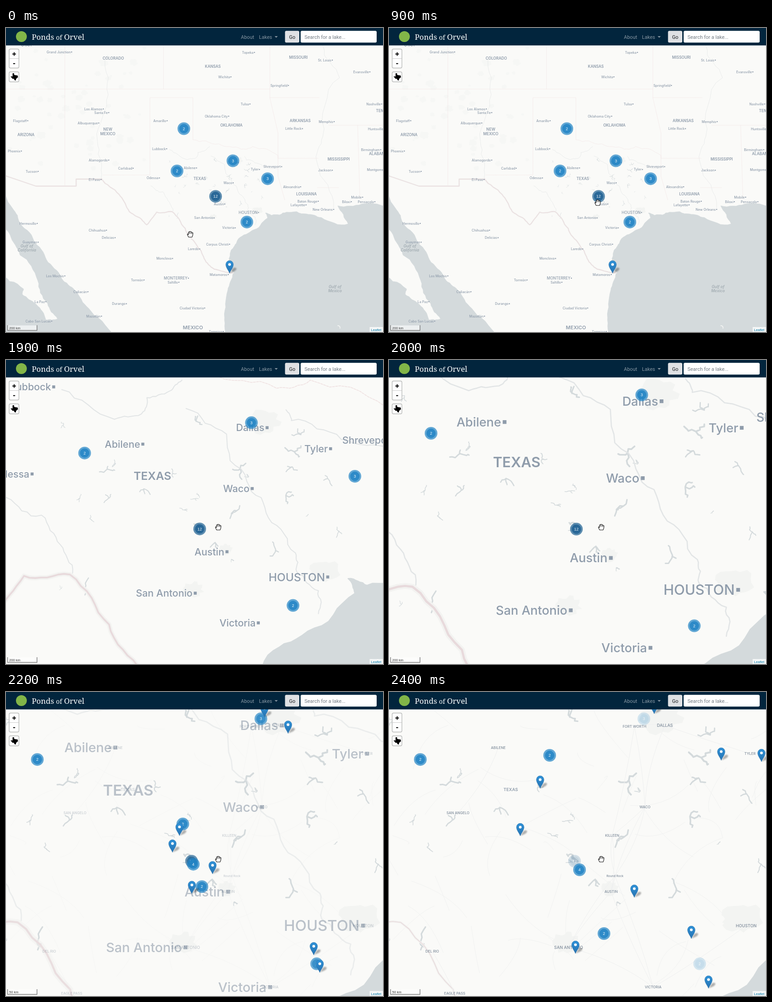
An HTML page that plays this animation: 833 by 672 pixels, repeating every 2500 ms.

```html
<!DOCTYPE html>
<html lang="en">
<head>
<meta charset="utf-8">
<title>Lake map</title>
<style>
  html, body { margin: 0; width: 100%; height: 100%; overflow: hidden; background: #fafaf8; }
  svg { display: block; width: 833px; height: 672px; }
  .map text { font-family: Inter, "Open Sans", sans-serif; font-weight: 600; fill: #8f9cab; text-anchor: middle; }
  .map .city { font-weight: 550; text-anchor: end; }
  .map .town { font-weight: 500; fill: #7f8c9b; }
  .map .water { font-style: italic; fill: #a3adb3; }
  .line { fill: none; stroke-linejoin: round; stroke-linecap: round; }
  .ui { font-family: Roboto, "Open Sans", sans-serif; font-size: 11px; }
  .small { font-family: "Liberation Sans", Arial, sans-serif; font-size: 7.6px; }
  .count { font-family: "Liberation Sans", Arial, sans-serif; font-size: 9px; fill: #fff; fill-opacity: .9; text-anchor: middle; }
</style>
</head>
<body>
<svg id="stage" viewBox="0 0 833 672"></svg>
<script>
const LOOP = 2500, STEP = 100, CENTER = [480.8, 371.6], ZOOM = 4;
const WATER = "#d4dadc", LAND = "#fafaf8";

function seeded(seed) {
  return () => {
    seed = (seed * 1664525 + 1013904223) >>> 0;
    return seed / 4294967296;
  };
}
const rnd = seeded(11);
const around = size => (rnd() - .5) * size;
const clamp = v => Math.max(0, Math.min(1, v));
const mix = (a, b, k) => a + (b - a) * k;
const zoomed = (x, y, s) => [mix(CENTER[0], x, s), mix(CENTER[1], y, s)];
const zoomTransform = s => `translate(${CENTER[0] * (1 - s)} ${CENTER[1] * (1 - s)}) scale(${s})`;
const line = (d, color, width, extra = "") =>
  `<path class="line" d="${d}" stroke="${color}" stroke-width="${width}" ${extra}/>`;
const text = (label, x, y, size, cls = "") =>
  `<text x="${x}" y="${y + size * .36}" font-size="${size}" class="${cls}">${label}</text>`;

// Natural line through a few points: every segment is split three times and bent at random
function rough(points, amount) {
  let list = points.split(" ").map(p => p.split(",").map(Number));
  for (let level = 0; level < 3; level++) {
    list = list.flatMap((p, i) => {
      const q = list[i + 1];
      if (!q) return [p];
      const bend = around(amount), dx = q[0] - p[0], dy = q[1] - p[1];
      return [p, [(p[0] + q[0]) / 2 - dy * bend, (p[1] + q[1]) / 2 + dx * bend]];
    });
  }
  return "M" + list.map(p => p.map(v => v.toFixed(1))).join("L");
}

function patch(x, y, size) {
  const d = [];
  for (let a = 0; a < 2 * Math.PI; a += .3) {
    const r = size * (.6 + .4 * rnd());
    d.push((x + Math.cos(a) * r).toFixed(1) + " " + (y + Math.sin(a) * r * .8).toFixed(1));
  }
  return "M" + d.join("L") + "Z";
}

// Reservoir: a few crooked arms leaving one centre
function reservoir(x, y, size) {
  let d = "";
  for (let arm = 0; arm < 3; arm++) {
    const a = rnd() * 2 * Math.PI;
    d += `M${x} ${y}`;
    for (let i = 0; i < 4; i++) d += `l${(Math.cos(a) * size / 4 + around(size / 2)).toFixed(1)} ${(Math.sin(a) * size / 4 + around(size / 2)).toFixed(1)}`;
  }
  return line(d, WATER, (size * .17).toFixed(1));
}

const gulf = rough("920,384 786,389 733,393 756,433 697,419 664,411 620,407 587,414 573,409 578,420 543,448 511,470 497,492 492,515 502,541 490,580 483,640 482,690", .2) + "V760H920Z";
const pacific = rough("-20,340 14,398 32,433 65,476 93,518 126,558 157,583 187,625 250,690", .16) + "H-20" +
  rough("-20,540 39,577 36,589 67,611 88,645 114,643 92,609 70,558 31,502 9,457 -20,410", .2).replace("M", "L") + "Z";
const border = "M0 327L66 349.5H155V334H211" +
  rough("211,333 250,368 269,400 284,414 311,435 333,407 367,406 396,443 420,478 438,510 460,533 502,541", .16).replace("M", "L");
const rivers = [
  "453,283 483,302 498,337 514,364 534,390 535,404 551,418 551,435",
  "361,269 400,291 420,287 424,275 441,270 450,262",
  "320,349 346,362 360,384 369,405",
  "527,284 531,292 568,306 599,311",
  "700,39 737,110 700,240 688,300 724,398",
  "225,60 222,160 203,260 210,333"
].map(r => rough(r, .3)).join("");
const stateLines = "M0 135H583V39M348 39V135M130 39V350M214 325H318V154H413V247" +
  rough("413,247 470,256 520,268 545,262 601,282", .2).replace("M", "L") +
  "V328L616 380M583 135V154H692M583 154L601 232V288H690M713 215H833M777 215L782 378M688 353H735";

const cities = [
  ["Grand Junction", 145, 53], ["Topeka", 549, 54], ["St. Louis", 721, 71], ["Wichita", 497, 108],
  ["Evansville", 804, 97], ["Springfield", 624, 127], ["Nashville", 830, 168], ["Tulsa", 539, 168],
  ["Oklahoma City", 492, 195], ["Memphis", 725, 207], ["Los Alamos", 215, 179], ["Santa Fe", 227, 187],
  ["Albuquerque", 205, 210], ["Amarillo", 356, 205], ["Flagstaff", 48, 205], ["Phoenix", 34, 272],
  ["Tucson", 71, 317], ["Alamogordo", 227, 292], ["Carlsbad", 281, 310], ["El Paso", 210, 335],
  ["Lubbock", 355, 267], ["Abilene", 421, 309.4], ["Odessa", 339, 331.5], ["Tyler", 560, 312.8],
  ["Waco", 502, 342.3], ["Dallas", 513, 297.2], ["Shreveport", 609, 306.5], ["Alexandria", 651, 351],
  ["Jackson", 721, 314.5], ["Little Rock", 655, 222.5], ["Birmingham", 828, 269], ["Huntsville", 836, 223],
  ["Montgomery", 844, 313], ["Baton Rouge", 690, 383], ["Lafayette", 663, 391], ["New Orleans", 724, 401],
  ["Mobile", 788, 374], ["Biloxi", 763, 384], ["Pensacola", 815, 384], ["Austin", 483.3, 389.1],
  ["San Antonio", 459.8, 419.8], ["Victoria", 506.5, 441.8], ["HOUSTON", 557.9, 407.8], ["MONTERREY", 403, 553],
  ["Corpus Christi", 494, 478], ["Laredo", 428, 488.5], ["Matamoros", 491, 545], ["Saltillo", 382, 562],
  ["Monclova", 368, 509.5], ["Torreón", 305, 557], ["Chihuahua", 222, 447], ["Delicias", 241, 463.5],
  ["Hermosillo", 69, 432], ["Guaymas", 71, 473.5], ["Los Mochis", 130, 548], ["Culiacán", 181, 583],
  ["La Paz", 88, 605], ["Cabo San Lucas", 101, 648], ["Durango", 266, 609.5], ["Mazatlán", 211, 637],
  ["Ciudad Victoria", 439, 619], ["Tampico", 480, 671]
];
const states = [
  ["UTAH", 45, 38], ["COLORADO", 237, 67], ["KANSAS", 457, 85], ["MISSOURI", 646, 65], ["NEW", 225, 224],
  ["MEXICO", 225, 234], ["ARIZONA", 44, 236], ["OKLAHOMA", 498, 215], ["ARKANSAS", 650, 205],
  ["MISSISSIPPI", 735, 290], ["ALABAMA", 823, 278], ["TENNESSEE", 842, 183], ["TEXAS", 428.1, 332.9],
  ["LOUISIANA", 664, 367]
];
// Places that only the closer map names
const smallTowns = [
  ["FORT WORTH", 496.2, 297.7], ["SAN ANGELO", 398.7, 345.5], ["KILLEEN", 483.9, 358],
  ["Round Rock", 485.4, 380.4], ["DEL RIO", 384.5, 422], ["EAGLE PASS", 396.9, 445.2]
];
const bigTowns = /DALLAS|HOUSTON|SAN ANTONIO/;
const towns = cities.filter(([n]) => /Abilene|Tyler|Waco|Dallas|Austin|San Antonio|Victoria$|HOUSTON/.test(n) && n !== "Ciudad Victoria")
  .concat(smallTowns).map(([n, x, y]) => [n === "Round Rock" ? n : n.toUpperCase(), ...zoomed(x, y, ZOOM)]);

const lakes = "400,55 245,255 140,283 137,197 330,210 406,360 455,415 520,320 530,195 690,145 684,190 710,95 665,275 635,435 70,551 790,225 822,380";

function ground() {
  const built = towns.filter(([n]) => bigTowns.test(n) || n === "AUSTIN").map(([n, x, y]) => {
    const size = n === "AUSTIN" ? 22 : n === "SAN ANTONIO" ? 34 : 52;
    return patch(x - size / 6, y - size / 3, size) + patch(x - size / 2, y - size / 3, size * .6);
  }).join("");
  const ponds = lakes.split(" ").map(p => reservoir(...p.split(",").map(Number), 12 + rnd() * 12)).join("");
  let specks = "";
  for (let i = 0; i < 12; i++) specks += reservoir(rnd() * 833, 45 + rnd() * 560, 6 + rnd() * 5);
  return `<g id="ground"><g transform="${zoomTransform(1 / ZOOM)}"><path d="${built}" fill="#f3f4f2"/>${ponds}${specks}</g>
    <path d="${gulf}${pacific}" fill="${WATER}" stroke="${WATER}" stroke-width=".8" stroke-linejoin="round"/></g>`;
}

function cityLabel([name, x, y]) {
  const size = name === name.toUpperCase() ? 8.3 : 7.25;
  return text(name, x - 2, y, size, "city") + `<rect x="${x - 1.1}" y="${y - 1.1}" width="2.2" height="2.2" fill="#8f9cab"/>`;
}
const waterLabel = (name, x, y) => text("Gulf of", x, y, 8.6, "water") + text(name, x, y + 8.5, 8.6, "water");

function wideMap() {
  let hills = "";
  for (let i = 0; i < 60; i++) hills += patch(rnd() * 310, 40 + rnd() * 270, 3 + rnd() * 9);
  return `<path d="${hills}" fill="#f6f7f5"/><use href="#ground"/>` +
    line(rivers, "#e2e5e6", .7) + line(stateLines, "#f0e3e3", .6, 'stroke-dasharray="1.5 .8"') +
    line(border, "#f3f3f1", 3.4) + line(border, "#e8dadc", 1.3) +
    states.map(([n, x, y]) => text(n, x, y, 8.3)).join("") + cities.map(cityLabel).join("") +
    text("MEXICO", 413, 662, 11) + waterLabel("California", 46, 482) + waterLabel("Mexico", 727, 572) +
    line("M733 658Q739 658 738 664", LAND, 1.4);
}

function closeMap() {
  let main = "", minor = "";
  const road = (a, b, bend) => `M${a}Q${(a[0] + b[0]) / 2 + around(bend)} ${(a[1] + b[1]) / 2 + around(bend)} ${b}`;
  towns.forEach(([, ...a], i) => towns.slice(i + 1).forEach(([, ...b]) => {
    if (Math.hypot(a[0] - b[0], a[1] - b[1]) < 260) main += road(a, b, 40);
  }));
  for (let i = 0; i < 60; i++) {
    const a = [rnd() * 833, 39 + rnd() * 633];
    minor += road(a, [a[0] + around(260), a[1] + around(220)], 60);
  }
  return `<rect width="833" height="672" fill="${LAND}"/>` + line(minor, "#f1f2f1", 1) +
    `<g transform="${zoomTransform(ZOOM)}"><use href="#ground"/>${line(border, "#f3f3f1", 1.2)}${line(border, "#e8dadc", .4)}</g>` +
    line(main, "#eff0f0", 1) + text("TEXAS", 269, 215.5, 9.5) +
    towns.map(([n, x, y]) => text(n, x, y, bigTowns.test(n) ? 9.1 : n === "Round Rock" ? 6.6 : 7.8, "town")).join("");
}

function cluster(x, y, count, opacity = 1) {
  const color = count > 9 ? "#1c5f92" : "#2183c4";
  return `<g transform="translate(${x} ${y})" opacity="${opacity}"><circle r="14" fill="${color}" fill-opacity=".7"/>
    <circle r="10.4" fill="${color}" fill-opacity=".8"/><text class="count" y="3.2">${count}</text></g>`;
}
const pin = (x, y) => `<g transform="translate(${x} ${y})">
  <path d="M0 0L7-10Q11-14 15-11 16-7 10-4Z" fill="#000" opacity=".3" filter="url(#soft)"/>
  <path d="M0 0C-2-6-8.3-12-8.3-19.4A8.3 8.3 0 0 1 8.3-19.4C8.3-12 2-6 0 0Z" fill="url(#pinFill)" stroke="#2a72ac" stroke-width=".7"/>
  <circle cy="-19.2" r="3" fill="#fff"/></g>`;

// Clusters on the wide map; kids are [x, y, count] on the closer one, without a count a single pin
const clusters = [
  { at: [393, 222.5], count: 2 },
  { at: [377.9, 316], count: 2 },
  { at: [501.4, 293.5], count: 3, kids: [[586, 48], [734, 151]] },
  { at: [578, 333.2], count: 3, kids: [[823, 154]] },
  { at: [463.1, 372.2], count: 12, kids: [[355, 140, 2], [334, 213], [290, 318], [421, 393, 4], [542, 454], [475, 534, 2], [412, 578]] },
  { at: [532.2, 428.9], count: 2, kids: [[668, 545], [706, 655]] }
];

function markers(t, scale) {
  const q = clamp((t - 2140) / 260), spread = 1 - (1 - q) ** 1.65, faded = 1 - .75 * q ** 1.6;
  const parents = clusters.map(c => cluster(...zoomed(...c.at, scale), c.count, c.kids ? faded : 1));
  const children = q === 0 ? [] : clusters.flatMap(({ at, kids = [] }) => kids.map(([x, y, count]) => {
    const from = zoomed(...at, scale), place = [mix(from[0], x, spread), mix(from[1], y, spread)];
    return count ? cluster(...place, count) : pin(...place);
  }));
  return parents.concat(pin(...zoomed(494, 542, scale)), children).join("");
}

const hull = '<path d="M444 309L455 313 498 394 487 416 464 426 432 357Z" fill="#ff8a1c" fill-opacity=".18" stroke="#ff9d42" stroke-width="1.9" stroke-linejoin="round"/>';
const openHand = `<path d="M-3.6 6.2L-6 1.6Q-6.8-.6-5.3-.8L-3.9 1V-3.9Q-3.6-5.6-1.9-5Q-1.5-6.6.2-6.3Q1.3-6.2 1.5-5Q3.5-5.6 3.9-3.8Q6.1-4 6.1-2L5.5 2.6 4 6.2Z" fill="#fff" stroke="#111" stroke-width="1.1" stroke-linejoin="round"/>
  <path d="M-1.6-4.6V-1M1.3-4.6V-1M3.8-3.5V-.7" stroke="#111"/>`;
const pointHand = `<path d="M-3 6.5L-6.4 1.2Q-6.8-.6-5-.2L-3.2 1.2V-5.2Q-3-6.8-1.8-6.6T-.7-5.2V-2Q1-2.8 1.6-1.5Q3.2-2 3.8-.7Q5.9-.9 6 1L5.2 4.4 4.2 6.5Z" fill="#111" stroke="#566" stroke-width=".7"/>
  <path d="M-.4 2.4V4.6M1.6 2.4V4.6M3.4 2.4V4.6" stroke="#9ab" stroke-width=".6"/>`;

function cursorAt(t) {
  if (t < 500) return [407, 456];
  if (t >= 1900) return [469, 369.5];
  if (t > 1000) return [467, t < 1200 ? 373 : 370];
  const k = (t - 500) / 500, e = k * k * (3 - 2 * k);
  return [mix(411, 467, e), mix(455, 378, e)];
}

const box = (x, y, w, h, fill, extra = "") => `<rect x="${x}" y="${y}" width="${w}" height="${h}" rx="3" fill="${fill}" ${extra}/>`;
const frame = 'stroke="#b9bab9" stroke-width="1.4"';
const chrome = `
  <rect width="833" height="38.5" fill="#02253d"/>
  <circle cx="34" cy="19" r="12" fill="#82b548"/>
  <text x="57" y="25.5" font-family="Noto Serif, serif" font-size="17" fill="#fff">Ponds <tspan font-size="14">of</tspan> Orvel</text>
  <g class="ui"><text x="519" y="23.5" fill="#8696a2">About</text><text x="559" y="23.5" fill="#8696a2">Lakes</text>
  <path d="M593.5 18H600.5L597 21.5Z" fill="#8696a2"/>
  ${box(616.5, 6.3, 31.5, 26, "#dfe1e4")}<text x="625.5" y="23.5" fill="#16191c">Go</text>
  ${box(651, 6.3, 168, 26, "#fff")}<text x="659.5" y="23.5" fill="#717a82">Search for a lake...</text></g>
  ${box(7, 46.5, 21.5, 42, "#fff", frame)}<path d="M7.5 67.5H28" stroke="#ccc"/>
  <path d="M14 57.5H22M18 53.5V61.5M15.8 78.8H20.2" stroke="#000" stroke-width="1.9"/>
  ${box(7, 97, 21.5, 22, "#fff", frame)}
  <path d="M14.5 100H18V103.5L21.5 104.5 25.5 104.8 26.5 109 23 111.5 21 116.5 18.8 115 17 111.8 15 112.8 13 110.5 10 107H14.5Z"/>
  <rect x="3.5" y="657.5" width="65" height="11" fill="#fff" fill-opacity=".6"/>
  <path d="M3.5 657V668.5H68.5V657" fill="none" stroke="#777" stroke-width="1.4"/>
  <text id="distance" class="small" x="7" y="666" fill="#333"></text>
  <rect x="803.5" y="661" width="30" height="11" fill="#fff" fill-opacity=".75"/>
  <text class="small" x="806.5" y="669.8" fill="#0078a8">Leaflet</text>`;

const stage = document.getElementById("stage");
stage.innerHTML = `<defs>${ground()}
  <linearGradient id="pinFill" x2="0" y2="1"><stop stop-color="#2f92d8"/><stop offset="1" stop-color="#2672b0"/></linearGradient>
  <filter id="soft" x="-50%" y="-50%" width="200%" height="200%"><feGaussianBlur stdDeviation="1.5"/></filter></defs>
  <rect width="833" height="672" fill="${LAND}"/>
  <g id="wide" class="map">${wideMap()}</g><g id="close" class="map">${closeMap()}</g>
  <g id="hull">${hull}</g><g id="markers"></g>${chrome}<g id="cursor"></g>`;
const part = id => document.getElementById(id);
const show = (id, on) => part(id).setAttribute("visibility", on ? "visible" : "hidden");

function draw(t) {
  const k = (t - 1900) / STEP;
  const scale = k < 0 ? 1 : k < 2 ? ZOOM - 3 * (.697 - .272 * k) ** 3 : ZOOM;
  const fade = clamp((t - 2120) / 200);
  part("wide").setAttribute("transform", zoomTransform(scale));
  show("wide", fade < 1);
  show("close", fade > 0);
  part("close").setAttribute("opacity", fade);
  show("hull", t >= 1100 && t < 1900);
  part("markers").innerHTML = markers(t, scale);
  part("distance").textContent = t < 2100 ? "200 km" : "50 km";
  part("cursor").innerHTML = t >= 1000 && t < 1900 ? pointHand : openHand;
  part("cursor").setAttribute("transform", `translate(${cursorAt(t)})`);
}

let shown = -1;
const start = performance.now();
function tick() {
  const t = Math.floor((performance.now() - start) % LOOP / STEP) * STEP;
  if (t !== shown) draw(shown = t);
  requestAnimationFrame(tick);
}
tick();
</script>
</body>
</html>
```
